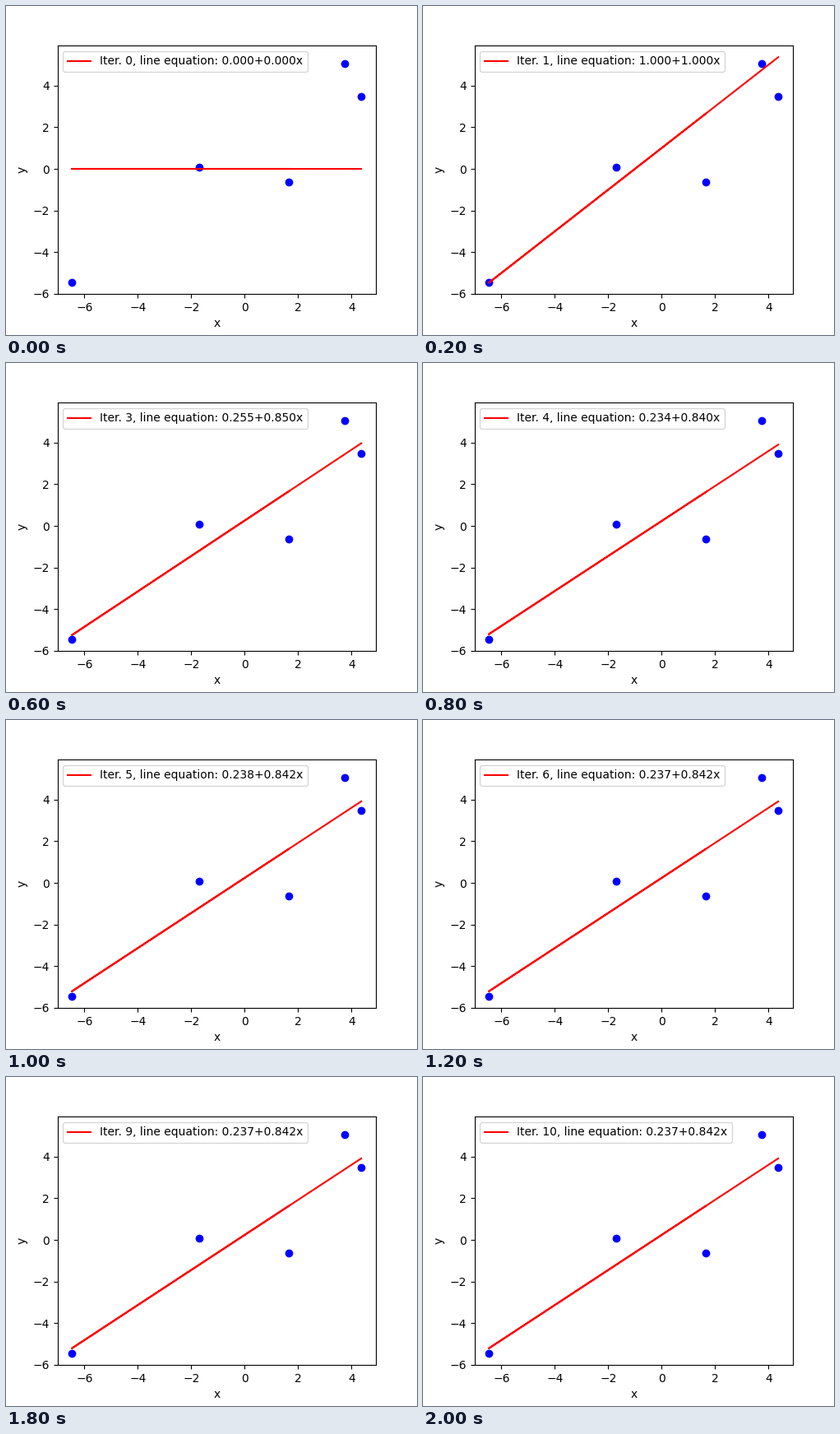
Write a matplotlib script that moves like this. It is 500x400 px and loops after 2.2 s.

```python
import numpy as np
import matplotlib.pyplot as plt
from matplotlib.animation import FuncAnimation

STEPS = 11
x = np.array([1.66, -1.69, -6.47, 3.745, 4.365])
y = np.array([-0.63, 0.07, -5.45, 5.05, 3.47])
best = np.array([0.2374, 0.8418])  # least-squares intercept and slope


def adagrad(steps, rate=1.0):
    """Intercept and slope after each Adagrad step on the squared error."""
    design = np.column_stack([np.ones_like(x), x])
    gram = design.T @ design
    theta = np.zeros(2)
    total = np.zeros(2)
    path = [theta]
    for _ in range(steps - 1):
        grad = gram @ (theta - best)
        total = total + grad ** 2
        theta = theta - rate * grad / np.sqrt(total)
        path.append(theta)
    return path


path = adagrad(STEPS)

fig, ax = plt.subplots(figsize=(5, 4), dpi=100)
fig.subplots_adjust(left=0.125, right=0.9, bottom=0.125, top=0.88)
ax.plot(x, y, "o", color="blue")
line, = ax.plot(x, 0 * x, color="red", label="line")
ax.set(xlabel="x", ylabel="y", xlim=(-7.01, 4.913), ylim=(-6.002, 5.925))
label = ax.legend(loc="upper left").get_texts()[0]


def update(i):
    b, a = path[i]
    line.set_ydata(b + a * x)
    label.set_text(f"Iter. {i}, line equation: {b:.3f}+{a:.3f}x")
    return line, label


anim = FuncAnimation(fig, update, frames=STEPS, interval=200,
                     repeat=True, repeat_delay=0, blit=False)
plt.show()
```
